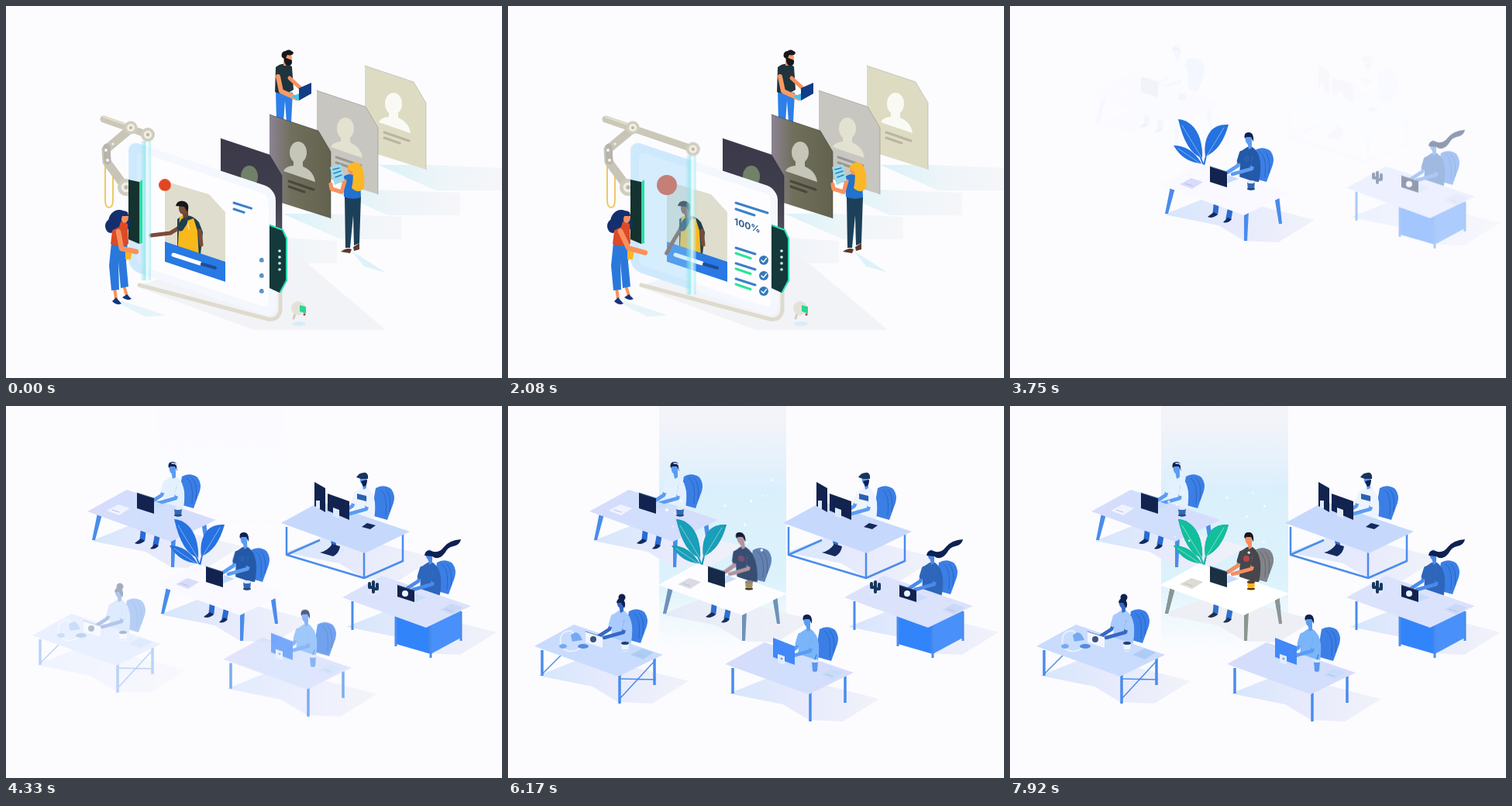
These frames come from a looping animation (640x480 px, 8000 ms). An HTML page:

```html
<!DOCTYPE html>
<html lang="en">
<head>
<meta charset="utf-8">
<title>Talent scan</title>
<style>
html, body { margin: 0; width: 100%; height: 100%; overflow: hidden; background: #fcfcff; }
svg { display: block; width: 100vw; height: 100vh; }
.a { animation: 8s ease-in-out infinite both; }
.tools { animation-name: leave; }
.screen { animation-name: screen; }
.slide { animation-name: slide; }
.scanTint { animation-name: scanTint; }
.rod { animation-name: rod; }
.beam { animation-name: beam; }
.badge { animation-name: badge; transform-box: fill-box; transform-origin: center; }
.row { stroke-dasharray: 1; animation-name: row; }
.row2 { stroke-dasharray: 1; animation-name: row2; }
.tick { animation-name: tick; transform-box: fill-box; transform-origin: center; }
.hostArm { animation-name: hostArm; }
.guestArm { animation-name: guestArm; }
.ray { animation-name: ray; }
.glow { animation-name: glow; }
.color { animation-name: color; }
.lean { animation-name: lean; transform-origin: 110px -8px; }
.spark { animation: rise 4s linear infinite; }
@keyframes leave { 0%, 38.5% { opacity: 1; transform: none; } 44.5%, 100% { opacity: 0; transform: translateY(-8px); } }
@keyframes screen { 0%, 32.5% { opacity: 1; } 36.5% { opacity: .3; } 39.5%, 100% { opacity: 0; } }
@keyframes slide { 0%, .5%, 31%, 100% { transform: none; } 13%, 19% { transform: translate(156px, 52px); } }
@keyframes scanTint { 0%, .5%, 31%, 100% { transform: none; } 13%, 19% { transform: translateX(156px); } }
@keyframes rod { 0%, .5%, 31%, 100% { d: path("M126 146L183 166"); } 13%, 19% { d: path("M126 146L339 218"); } }
@keyframes beam { 0%, 29% { opacity: 1; } 31%, 100% { opacity: 0; } }
@keyframes badge { 0% { transform: scale(.6); } 4%, 100% { transform: none; } }
@keyframes row { 0% { stroke-dashoffset: .45; } 5%, 100% { stroke-dashoffset: 0; } }
@keyframes row2 { 0%, 2% { stroke-dashoffset: 1; } 11%, 100% { stroke-dashoffset: 0; } }
@keyframes tick { 0% { transform: scale(.45); } 8%, 100% { transform: none; } }
@keyframes hostArm {
  0%, 30%, 100% { d: path("M145 291L149 313L168 317"); }
  7%, 22% { d: path("M145 290L162 312L186 320"); }
}
@keyframes guestArm {
  0% { d: path("M230 282L212 293L187 296"); }
  7%, 22% { d: path("M226 286L209 302L188 320"); }
  30%, 100% { d: path("M224 282L220 300L221 318"); }
}
@keyframes ray { 0%, 53% { opacity: 0; } 60%, 100% { opacity: 1; } }
@keyframes glow { 0%, 64% { opacity: 0; } 76%, 100% { opacity: 1; } }
@keyframes color { 0%, 70% { opacity: 0; } 83%, 100% { opacity: 1; } }
@keyframes lean { 0%, 48%, 98%, 100% { transform: none; } 74% { transform: skewX(9deg); } }
@keyframes rise { from { transform: translateY(12px); opacity: 0; } 30%, 70% { opacity: 1; } to { transform: translateY(-12px); opacity: 0; } }
</style>
</head>
<body>
<script>
const at = (x, y, body, attrs = '') => `<g transform="translate(${x} ${y})"><g ${attrs}>${body}</g></g>`;
const skew = (x, y, body, attrs = '') => `<g transform="matrix(1 .333 0 1 ${x} ${y})"><g ${attrs}>${body}</g></g>`;
const shape = (d, fill, attrs = '') => `<path d="${d}" fill="${fill}" ${attrs}/>`;
const line = (d, color, width, attrs = '') =>
  `<path d="${d}" fill="none" stroke="${color}" stroke-width="${width}" stroke-linecap="round" stroke-linejoin="round" ${attrs}/>`;
const bar = (d, color, width) => line(d, color, width, 'style="stroke-linecap:butt"');
const dot = (x, y, r, fill, attrs = '') => `<circle cx="${x}" cy="${y}" r="${r}" fill="${fill}" ${attrs}/>`;
const oval = (x, y, rx, ry, fill) => `<ellipse cx="${x}" cy="${y}" rx="${rx}" ry="${ry}" fill="${fill}"/>`;
const gradient = (id, stops, dir = '') => `<linearGradient id="${id}" ${dir}>${stops.map(([o, c, a = 1]) =>
  `<stop offset="${o}" stop-color="${c}" stop-opacity="${a}"/>`).join('')}</linearGradient>`;
const down = 'x1="0" y1="0" x2="0" y2="1"';

const defs = `<defs>
${gradient('top', [[0, '#d8dcfb'], [.5, '#cfdffd'], [1, '#d8dcfb']])}
${gradient('floor', [[0, '#d5e6fc'], [.45, '#e6eafc'], [1, '#f1f2f9']])}
${gradient('cast', [[0, '#d8f2f8'], [.5, '#eef5f9'], [1, '#f6f6f9']])}
${gradient('olive', [[0, '#8c8393'], [.35, '#706f5c'], [1, '#62624f']])}
${gradient('night', [[0, '#3b3949'], [.6, '#403f4d'], [1, '#5b5662']], down)}
${gradient('light', [[0, '#8ce6ee', .15], [.4, '#8ce6ee', .75], [.6, '#ffffff', .8], [1, '#8ce6ee', .5]])}
${gradient('gray', [[0, '#eceef5', .6], [.5, '#eef1f8', .6], [1, '#f4f6fb', 0]], down)}
${gradient('cyan', [[0, '#d4ecfd', 0], [.3, '#d2edfc', .75], [.7, '#cfeff9', .7], [1, '#d8f3f8', 0]], down)}
<clipPath id="pane"><rect width="190" height="167" rx="14"/></clipPath>
<clipPath id="photo"><path d="M205 200H283V356L205 330Z"/></clipPath>
</defs>`;

/* ---------- scanner ---------- */

const profile = (x, y, back, face, ink) => at(x, y,
  shape('M0 0L63 21L79 48V134L0 109Z', back) + line('M0 0L63 21L79 48V134', ink, 1, 'opacity=".5"') +
  oval(37, 49, 11, 14, face) + shape('M31 58H43V67Q57 73 59 87L18 73Q20 67 31 66Z', face) +
  line('M25 86L57 97M25 93L45 100', ink, 3, 'opacity=".7"'));
const profileShadow = (x, y, w) => at(x, y, shape(`M17 128H79L${w} 132V161H92Z`, 'url(#cast)'));

const engineer =
  shape('M348 108L370 112L368 150H362L360 122L358 150H349Z', '#2d7fe9') +
  shape('M348 79Q357 71 369 78L371 108Q360 116 347 111Z', '#20343d') +
  line('M366 93L380 106', '#f3925f', 5) + line('M351 91L355 110L375 119', '#f99a66', 6) +
  shape('M378 106L394 99V113L378 122Z', '#123c86') + shape('M368 117L378 113V122Z', '#43c5ef') +
  shape('M358 68H366V77H358Z', '#f3925f') + oval(364, 67, 5, 7, '#f99a66') +
  shape('M359 66L369 70Q370 78 363 77Q358 75 359 66Z', '#15181d') +
  shape('M356 66Q354 59 361 58Q365 54 371 60Q370 65 363 63L360 69Z', '#15181d');

const analyst =
  shape('M445 315L490 344L462 336Z', '#dff2f8') +
  shape('M437 246H458L456 306L449 309L448 270L444 312H438Z', '#1d405a') +
  shape('M432 317Q440 311 446 314L444 319ZM448 311L456 306V314L449 316Z', '#5a3a2e') +
  shape('M435 220Q446 213 457 221L458 247Q446 251 436 246Z', '#2272cf') +
  line('M437 226L433 240L420 236L419 230', '#f9915d', 5) +
  shape('M418 208L432 204L437 225L424 231Z', '#9edcec') + line('M422 211L430 209M423 216L432 213M425 221L433 218', '#2e7ec4', 1.5) +
  oval(447, 211, 6, 7, '#f9915d') +
  shape('M441 207Q447 199 456 203Q464 213 462 235Q455 243 446 235Q449 222 447 213Q441 213 441 207Z', '#fbb726');

const host =
  shape('M148 380L206 399L180 401L150 386Z', '#e5f4f9') +
  line('M140 363L142 378M152 361L156 374', '#f9915d', 4) +
  shape('M137 381L142 376L149 384Q143 387 137 381ZM150 376L156 372L162 378Q156 381 150 376Z', '#16357d') +
  shape('M136 305H157L155 330L158 362L148 364L145 330L146 366L136 367L133 335Z', '#2a78dc') +
  oval(146, 279, 14, 16, '#142f6e') + oval(135, 284, 7, 9, '#142f6e') +
  shape('M138 282Q147 275 157 281L158 307Q147 312 135 307Z', '#dc4a28') +
  shape('M154 314L163 312L161 327H154Z', '#fbb726') +
  oval(153, 272, 5, 8, '#f9915d') + shape('M141 268Q146 261 157 266L158 271L150 271L146 285L136 290Z', '#142f6e') +
  line('M145 291L149 313L168 317', '#f9915d', 6.5, 'class="a hostArm"');

const guest = `<g clip-path="url(#photo)">` +
  shape('M205 226L262 243L283 266V356L205 330Z', '#dfddcd') +
  shape('M221 275Q236 264 249 279L254 292L250 330H221Z', '#1d3f4e') +
  line('M250 290L252 308', '#7b4b37', 5) +
  shape('M224 272L229 270L234 277L242 274L247 290L249 325H221Z', '#fab91b') +
  line('M234 277L236 288', '#fff0c0', 1) +
  shape('M227 262H235V272L229 275Z', '#6d4130') + oval(229, 261, 6, 8, '#7b4b37') +
  shape('M219 258Q221 250 230 252Q238 255 234 266L230 259Z', '#14171c') +
  shape('M205 304L283 330V356L205 330Z', '#2879e3') + '</g>' +
  line('M216 321L250 332', '#fff', 5) + line('M253 333L270 338', '#1e4d94', 4) +
  line('M230 282L212 293L187 296', '#7b4b37', 5, 'class="a guestArm"') +
  line('M230 278L225 286', '#1d3f4e', 9);

const checkRow = i => at(294, 312 + i * 20,
  line('M0 0L25 8', '#3b80c9', 3, 'pathLength="1" class="a row2"') +
  line('M0 7L19 13.5', '#2ce394', 3, 'pathLength="1" class="a row2"') +
  `<g class="a tick">${dot(36, 16, 6, '#3478bd')}${line('M33 16L35.5 18.5L39.5 13.5', '#fff', 1.5)}</g>`);

const screen = `<g class="a screen">` +
  shape('M168 362L320 418H490L398 340L350 300Z', '#f2f3f7') +
  line('M172 360L338 404Q352 406 354 392V296', '#dedbcd', 5) +
  skew(158, 173, '<rect width="190" height="167" rx="14" fill="#f4f7fd"/><rect x="11" y="11" width="170" height="146" rx="8" fill="#fdfdff"/>') +
  guest + dot(205, 231, 13, '#e2451f', 'class="a badge"') +
  line('M294 254L335 267', '#3b80c9', 3, 'pathLength="1" class="a row"') +
  line('M294 262L318 270', '#3b80c9', 3, 'pathLength="1" class="a row"') +
  skew(292, 282, '<text id="score" font-family="Inter,Arial,sans-serif" font-size="12" font-weight="700" fill="#315f90"></text>') +
  [0, 1, 2].map(checkRow).join('') +
  skew(158, 173, '<g class="a scanTint"><rect x="-190" y="-10" width="215" height="190" fill="#99d4fa" opacity=".4"/></g>', 'clip-path="url(#pane)"') + '</g>';

const ring = (x, y, r) => dot(x, y, r, '#d0cdbf') + dot(x, y, r * .58, '#f1efe6') + dot(x, y, r * .25, '#bdb9a9');

const arm =
  line('M128 204V250Q128 260 133 260Q138 260 138 250V215', '#edca60', 2) +
  line('M159 160L129 185L130 201L152 231', '#c8c5b7', 11) + line('M130 182L131 200', '#b6b4ad', 9) +
  dot(129, 186, 2, '#f7f6ee') + dot(131, 199, 2, '#f7f6ee') + dot(138, 178, 1.5, '#f7f6ee') + ring(155, 234, 11) +
  line('M126 146L183 166', '#cbc8b9', 9, 'class="a rod"') + line('M126 143L155 153', '#e4e0c9', 2) + ring(161, 157, 8.5) +
  `<g class="a slide"><g class="a beam"><rect x="174" y="174" width="13" height="180" fill="url(#light)"/></g>${ring(183, 166, 9)}</g>`;

const clamps =
  shape('M158 224L172 227V307L158 301Z', '#14322f') + shape('M172 227L176 224V306L172 307Z', '#25dfa0') +
  shape('M340 282L357 289L363 300V354L353 370L340 364Z', '#15383a') +
  line('M341 283L357 289L362 300V354L354 369', '#29dfb0', 2) +
  [316, 324, 332, 340].map(y => dot(353, y, 1.8, '#d8fff6')).join('');

const camera = oval(378, 410, 9, 3, '#d9ecf8') + line('M374 395L371 403', '#d1cec0', 3) +
  dot(377, 390, 9, '#e4e2d6') + shape('M379 386L387 388L387 397L379 394Z', '#2bd693') + dot(385, 398, 1.5, '#a23c50');

const scanner = `<g class="a tools">` +
  profileShadow(463, 77, 185) + profileShadow(401, 109, 185) + profileShadow(340, 140, 170) + profileShadow(277, 171, 150) +
  profile(463, 77, '#dedbc3', '#fafaf5', '#aaa692') + profile(401, 109, '#c8c6c0', '#e3e1d0', '#85837c') + engineer +
  profile(340, 140, 'url(#olive)', '#c5c5b8', '#38382f') + profile(277, 171, 'url(#night)', '#718169', '#20212e') +
  analyst + '</g>' + screen + `<g class="a tools">${arm}${clamps}${camera}${host}</g>`;

/* ---------- office: desk coordinates start at the left corner of the table top ---------- */

const blue = { skin: '#5b9cf3', shirt: '#dcebfd', hair: '#0f2152', chair: '#3b7fe6', seat: '#2a66c4', top: 'url(#top)',
  leg: '#4a8cec', floor: 'url(#floor)', pants: '#2c6bd2', shoe: '#142a60', paper: '#f0f3ff', mug: '#3568b4', laptop: '#12234f' };

const hairs = {
  short: c => shape('M109 -60Q107 -68 114 -68Q121 -68 120 -56L117 -62L111 -62Z', c.hair),
  headset: c => hairs.short(c) + line('M113 -66Q121 -67 120 -58', '#e4f1ff', 1.5),
  cap: c => shape('M105 -62Q109 -69 117 -68Q121 -66 120 -60H111Z', '#173363') + shape('M111 -57L119 -59Q119 -50 114 -50Z', c.hair),
  bun: c => dot(116, -66, 4.5, c.hair) + shape('M109 -59Q110 -66 117 -64Q122 -59 119 -52L115 -59Z', c.hair),
  flowing: c => shape('M108 -58Q109 -66 117 -64Q126 -60 133 -69Q140 -78 155 -79Q154 -72 145 -70Q138 -69 134 -61Q126 -51 118 -57Z', c.hair)
};

const chair = c => shape('M122 -45Q132 -51 142 -44Q148 -36 145 -26L137 -4L116 -10Z', c.chair) +
  line('M128 -43Q138 -38 135 -10M135 -43Q143 -36 140 -15', c.seat, 1);
const torso = (c, hair) =>
  shape('M103 -43L112 -49H119Q127 -43 129 -30Q130 -16 127 -4L102 -7Q103 -26 103 -43Z', c.shirt) +
  shape('M112 -56H118V-48L114 -46Z', c.skin) + oval(114, -59, 4.3, 6.5, c.skin) + hairs[hair](c);
const arms = c => line('M121 -36L118 -21L93 -14', c.skin, 4.5) + line('M104 -37L100 -25L86 -16', c.skin, 4.5) +
  line('M123 -39L120 -27M105 -41L102 -31', c.shirt, 6.5);

const feet = c => line('M73 17L71 36M92 22L88 43', c.pants, 7) +
  shape('M61 41L69 35L74 38Q67 44 61 41ZM81 48L87 42L92 44Q87 50 81 48Z', c.shoe);
const taperLegs = c => shape('M13 2L19 4L10 37H6Z', c.leg) + shape('M108 34H114L112 72H108Z', c.leg) + shape('M147 14L153 12L157 50H153Z', c.leg);
const straightLegs = c => bar('M10 5V38M110 35V74M155 14V50', c.leg, 3.5);
const paper = (x, y, c) => at(x, y, shape('M0 0L15 -8L30 -3L16 6Z', c.paper) + line('M7 -1L16 2', '#b3bfe8', 1));
const mug = (c, x = 117, y = 1) => at(x, y, shape('M-5 -5H5L4 5Q0 7 -4 5Z', c.mug) + oval(0, -5, 5, 2, c.rim || '#dfe9fa') + line('M-4 4H4', c.band || '#26487d', 2));
const laptop = (c, x = 64, y = -24, h = 20) => at(x, y, shape('M22 22L37 16L23 11Z', '#c6dcf9') +
  shape(`M0 0L22 7V${h + 7}L0 ${h}Z`, c.laptop) + line('M0 0L22 7', '#4f6f9f', .8));

const desk = (c, p) => shape('M5 38L70 12L199 45L152 74L108 72L75 52Z', c.floor) + p.legs(c) + chair(c) +
  at(p.dx, p.dy, torso(c, p.hair), p.move) + shape('M0 0L51 -28L166 11L108 39Z', c.top) +
  at(p.dx, p.dy, arms(c), p.move) + p.items(c);

const plant = c => line('M56 -25Q49 -45 33 -70M56 -25Q60 -48 77 -73M54 -24Q45 -38 26 -45', c.leaf, 2) +
  shape('M23 -85Q43 -83 51 -60Q55 -46 54 -35Q33 -41 23 -85Z', c.leaf) +
  shape('M88 -78Q79 -45 58 -37Q55 -58 66 -71Q74 -79 88 -78Z', c.leaf) +
  shape('M17 -51Q40 -51 53 -28Q30 -29 17 -51Z', c.leaf) +
  line('M28 -77L54 -34M82 -74L59 -36M23 -47L51 -28', c.vein, .8);

const central = {
  dx: 0, dy: 0, hair: 'short', move: 'class="a lean"', legs: c => plant(c) + taperLegs(c) + feet(c),
  items: c => paper(25, -1, c) + laptop(c) + mug(c) + at(0, 0, dot(111, -34, 4, c.print, 'opacity=".8"'), 'class="a lean"')
};
const cool = { ...blue, shirt: '#2459a8', top: '#f9f9ff', leaf: '#2572e0', vein: '#94c2f7', print: '#2a62ae', paper: '#d8dcfa' };
const warm = { ...cool, skin: '#f88d5d', shirt: '#46474c', hair: '#17191e', chair: '#83848a', seat: '#66676c', top: '#ffffff',
  leg: '#8b9690', floor: '#eeeff4', pants: '#2f72d2', shoe: '#22314f', paper: '#dddbd2', mug: '#fab51b', band: '#4a3326', rim: '#5a3c26',
  laptop: '#1b3040', leaf: '#12bf9c', vein: '#9be8cc', print: '#cf4450' };

const desks = [
  { x: 105, y: 136, start: 3690, dx: -4, dy: 4, hair: 'headset', legs: c => taperLegs(c) + feet(c), c: { ...blue, shirt: '#e3f1fe' },
    items: c => paper(25, -1, c) + laptop(c) + mug(c) },
  { x: 355, y: 151, start: 3710, dx: -8, dy: 3, hair: 'cap', c: { ...blue, shirt: '#eef4fe', top: '#c6d9fc' },
    legs: c => bar('M7 5V41L107 71L157 49V12M107 34V71M7 41L50 22', c.leg, 2.5) +
      line('M66 16L68 28', c.pants, 6) + shape('M50 38Q60 36 66 27L76 30Q75 39 67 43Z', c.shoe),
    items: c => shape('M43 -53L57 -45V-14L43 -22Z', '#12234f') + shape('M60 -38L88 -28V-4L60 -16Z', '#12234f') +
      shape('M45 -29H50V-18L45 -20ZM67 -20L75 -17V-6L67 -9Z', '#dceafc') + shape('M104 5L111 0L122 3L115 8Z', '#14295b') +
      shape('M98 -38L110 -35V-28L98 -31Z', '#2a62ae') },
  { ...central, x: 194, y: 231, start: 3330, c: cool, recolor: warm },
  { x: 434, y: 247, start: 3550, dx: -2, dy: 4, hair: 'flowing', c: { ...blue, skin: '#4a8aea', shirt: '#2d66bb', top: '#dbe2fc' },
    legs: c => shape('M69 18L114 33V73L69 60Z', '#3284fb') + shape('M114 33L153 16V52L114 73Z', '#4a90fa') +
      bar('M13 5V42M69 20V63M114 36V78M153 18V56', c.leg, 3),
    items: c => oval(40, -6, 7, 3, '#dfeafc') + line('M40 -7V-20M35 -18V-13H40M45 -17V-11H40', '#17365e', 4) +
      laptop(c, 71, -16, 15) + dot(81, -5, 4, '#eaf3ff') + paper(126, 16, { paper: '#cbd8f7' }) },
  { x: 280, y: 333, start: 4060, dx: -8, dy: 4, hair: 'short', legs: straightLegs, c: { ...blue, shirt: '#7ab4f9' },
    items: c => shape('M62 -34L90 -23V1L62 -9Z', '#4288f8') + shape('M68 -13L77 -10V1L68 -2Z', '#e3edff') + dot(73, -7, 1.5, '#7c9fdb') +
      shape('M112 -4H120L119 9Q116 11 113 9Z', '#5b96f0') + oval(116, -4, 4.5, 2, '#d9e9ff') + line('M116 -6L118 -12', '#2c6bc6', 1) +
      paper(123, 14, { paper: '#c6dcfa' }) },
  { x: 34, y: 310, start: 4150, dx: -3, dy: 3, hair: 'bun', c: { ...blue, skin: '#3568c4', shirt: '#a9cafc', top: '#c9dcfe' },
    legs: c => straightLegs(c) + line('M110 68L156 18M110 42L156 43M10 36L36 10', c.leg, 1.5),
    items: c => line('M34 -2Q31 -20 47 -20L53 -14M34 0Q45 12 60 2', '#e5f0ff', 2) + shape('M47 -14Q56 -24 62 -8L49 -6Z', '#75aaf1') +
      oval(37, 0, 5, 3, '#75aaf1') + oval(63, 0, 7, 3, '#548cd9') + laptop({ laptop: '#f0f5ff' }, 66, -19, 14) + dot(76, -9, 4, '#39547e') +
      mug({ mug: '#edf4ff', rim: '#24406f', band: '#cfdcf4' }) + paper(124, 11, { paper: '#aecdf5' }) }
];

const random = (seed => () => (seed = seed * 16807 % 2147483647) / 2147483647)(41);
const sparks = Array.from({ length: 14 }, () =>
  dot(205 + random() * 145, 95 + random() * 90, .8 + random(), '#fff', `class="spark" style="animation-delay:${-4 * random()}s"`)).join('');

const light = `<g class="a ray"><rect x="195" width="164" height="260" fill="url(#gray)"/></g>` +
  `<g class="a glow"><rect x="195" y="20" width="164" height="294" fill="url(#cyan)"/></g>`;

const dropRule = ({ start }, i) => `@keyframes drop${i} {
  0%, ${start / 80}% { opacity: 0; transform: translateY(-22px); }
  ${(start + 430) / 80}%, 100% { opacity: 1; transform: none; } }`;
const office = light + desks.map((d, i) => at(d.x, d.y,
  desk(d.c, d) + (d.recolor ? `<g class="a color">${desk(d.recolor, d)}</g>` : ''),
  `class="a" style="animation-name:drop${i}"`)).join('') + `<g class="a glow">${sparks}</g>`;

const style = document.createElement('style');
style.textContent = desks.map(dropRule).join('');
document.head.append(style);
document.body.innerHTML = `<svg viewBox="0 0 640 480">${defs}${scanner}${office}</svg>`;

const score = document.getElementById('score');
function count() {
  const progress = Math.min(1, (performance.now() % 8000 - 120) / 900);
  score.textContent = progress > 0 ? Math.round(progress * 100) + '%' : '';
  requestAnimationFrame(count);
}
count();
</script>
</body>
</html>
```
